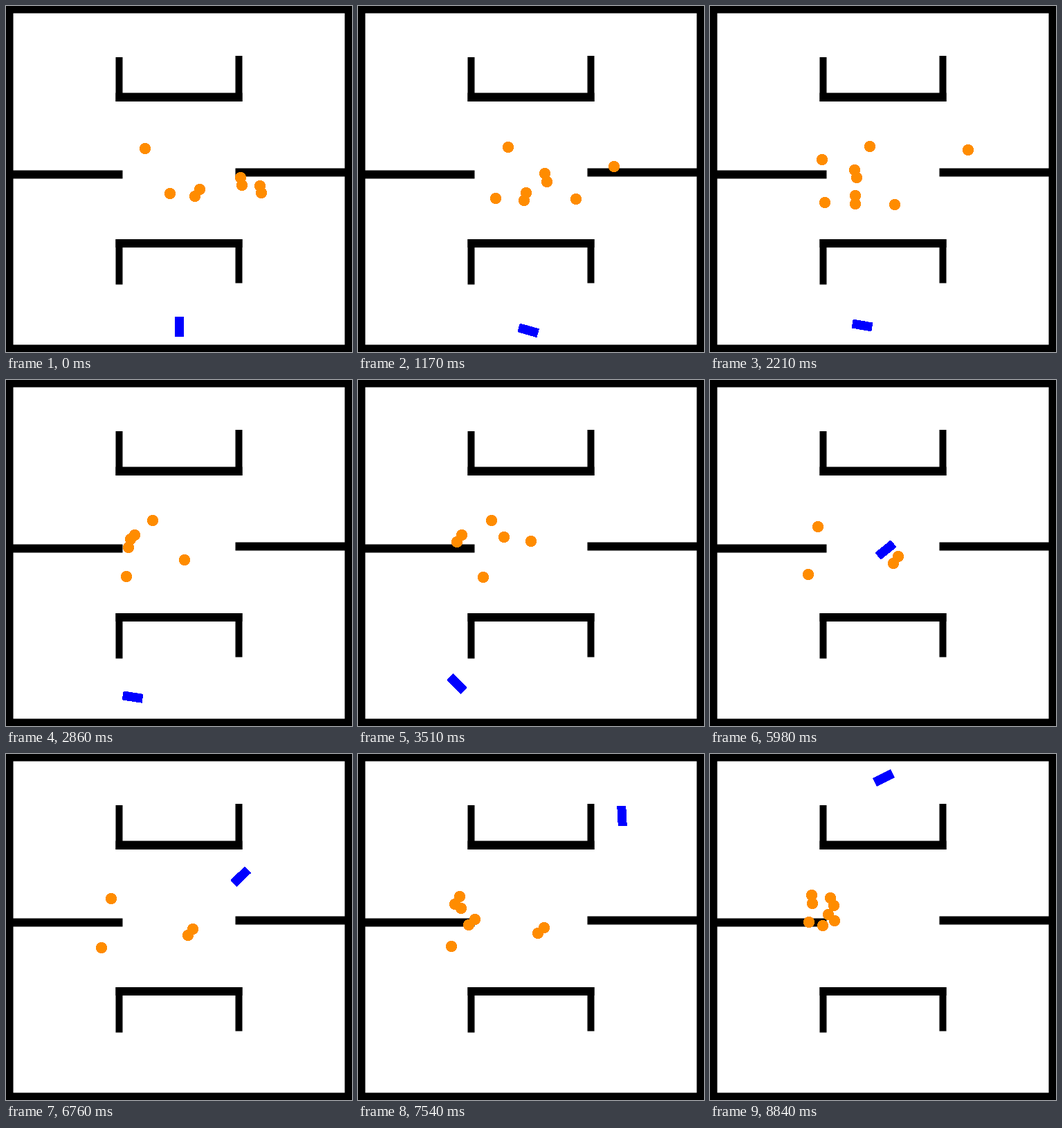
Write a matplotlib script that moves like this. It is 500 px wide and 500 px high and loops after 8.97 s.

```python
import numpy as np
import matplotlib.pyplot as plt
from matplotlib.animation import FuncAnimation
from matplotlib.patches import Circle, Polygon, Rectangle

SIZE, FRAMES, STEP_MS = 500, 69, 130
CAR_W, CAR_L = 12, 28
DOT_R = 7.4
LEG_GAP = 12
LINGER = 4  # steps a walker stays visible outside its beats

# x0, y0, x1, y1
EDGE = 10.5
WALLS = [
    (0, 0, SIZE, EDGE), (0, SIZE - EDGE, SIZE, SIZE),
    (0, 0, EDGE, SIZE), (SIZE - EDGE, 0, SIZE, SIZE),
    (0, 237.5, 168.5, 249.5), (331.5, 234.5, SIZE, 246.5),
    (158.5, 125.5, 341.5, 138), (158.5, 337, 341.5, 349),
]
for left, top, bottom in [(158.5, 74, 402.5), (331.5, 72, 400.5)]:
    WALLS += [(left, top, left + 10, 138), (left, 337, left + 10, bottom)]

# step, position x + yj, heading in degrees (0 = down, 90 = left, 180 = up)
CAR = [
    (0, 250.5 + 463.5j, 0), (5, 249.5 + 468j, 28), (17, 220 + 461.5j, 100),
    (27, 143 + 439j, 136), (35, 124.5 + 345j, 196), (46, 254 + 245.5j, 231),
    (58, 381.5 + 89.5j, 177), (68, 251 + 34.5j, 63),
]

# Walkers go straight from one beat to the next.
BEATS = [0, 17, 27, 35, 46, 58, 68]

# first beat, positions
SOLO = [
    (0, [201 + 206j, 231 + 203j, 193 + 203j, 174 + 207j, 156 + 212j,
         147 + 206j, 163 + 248j]),
    (0, [237 + 271j, 166 + 284j, 181 + 285j, 145 + 282j, 142 + 281j,
         135 + 278j, 143 + 243j]),
    (0, [367 + 260j, 373 + 208j]),
    (0, [369 + 270j, 267 + 287j, 250 + 233j]),
    (1, [162 + 222j, 211 + 227j]),
]
# first beat, middle between the legs, angle of the line through them
PAIRS = [
    (0, [276.5 + 270j, 210 + 280.5j], [121, 90]),
    (0, [340 + 253.5j, 210.5 + 242.5j, 146.5 + 229j], [81, 77, 125]),
    (3, [318 + 244.5j, 268.5 + 260j, 264.5 + 255j, 176.5 + 213.5j],
     [109, 125, 132, 67]),
    (3, [377 + 276.5j], [110]),
    (5, [144.5 + 220j, 147.5 + 210j], [34, 84]),
    (5, [164.5 + 243j, 175.5 + 236.5j], [132, 45]),
]


def speed(t):
    return np.clip(0.43 * (t - 3.4), 1, 17.3)


def car_state(t):
    """Position and unit direction on a Hermite curve through the car's keys."""
    i = max(k for k in range(len(CAR) - 1) if CAR[k][0] <= t)
    (t0, p, a), (t1, q, b) = CAR[i], CAR[i + 1]
    h = t1 - t0
    u = (t - t0) / h
    m = h * speed(t0) * 1j * np.exp(1j * np.radians(a))
    n = h * speed(t1) * 1j * np.exp(1j * np.radians(b))
    pos = (p * (1 + 2 * u) * (1 - u) ** 2 + q * u * u * (3 - 2 * u)
           + m * u * (1 - u) ** 2 - n * u * u * (1 - u))
    vel = (6 * u * (1 - u) * (q - p)
           + m * (1 - u) * (1 - 3 * u) + n * u * (3 * u - 2))
    return pos, vel / abs(vel)


def car_corners(t):
    pos, ahead = car_state(t)
    corners = [pos + ahead * (sx * CAR_L + sy * CAR_W * 1j) / 2
               for sx, sy in [(1, 1), (1, -1), (-1, -1), (-1, 1)]]
    return [(c.real, c.imag) for c in corners]


def dot_spots(t):
    """Centres of all dots on show at step t."""
    spots = []
    for first, keys, *lean in SOLO + PAIRS:
        beats = BEATS[first:first + len(keys)]
        if not beats[0] - LINGER <= t <= beats[-1] + LINGER:
            continue
        mid = np.interp(t, beats, keys)
        if lean:
            angle = np.radians(np.interp(t, beats, lean[0]))
            leg = LEG_GAP / 2 * np.exp(1j * angle)
            spots += [mid - leg, mid + leg]
        else:
            spots.append(mid)
    return spots


fig = plt.figure(figsize=(5, 5), dpi=100, facecolor="white")
ax = fig.add_axes([0, 0, 1, 1])
ax.set_xlim(0, SIZE)
ax.set_ylim(SIZE, 0)
ax.axis("off")

for x0, y0, x1, y1 in WALLS:
    ax.add_patch(Rectangle((x0, y0), x1 - x0, y1 - y0, fc="black", lw=0,
                           snap=False))
car = ax.add_patch(Polygon(car_corners(0), fc="#0000ff", lw=0,
                           antialiased=False, snap=False, zorder=2))
dots = [ax.add_patch(Circle((0, 0), DOT_R, fc="#ff8c00", lw=0,
                            antialiased=False, snap=False, zorder=3))
        for _ in range(len(SOLO) + 2 * len(PAIRS))]


def update(t):
    car.set_xy(car_corners(t))
    spots = dot_spots(t)
    for i, dot in enumerate(dots):
        dot.set_visible(i < len(spots))
        if i < len(spots):
            dot.center = round(spots[i].real), round(spots[i].imag)
    return [car, *dots]


anim = FuncAnimation(fig, update, frames=FRAMES, interval=STEP_MS,
                     repeat=True, repeat_delay=0)
plt.show()
```
